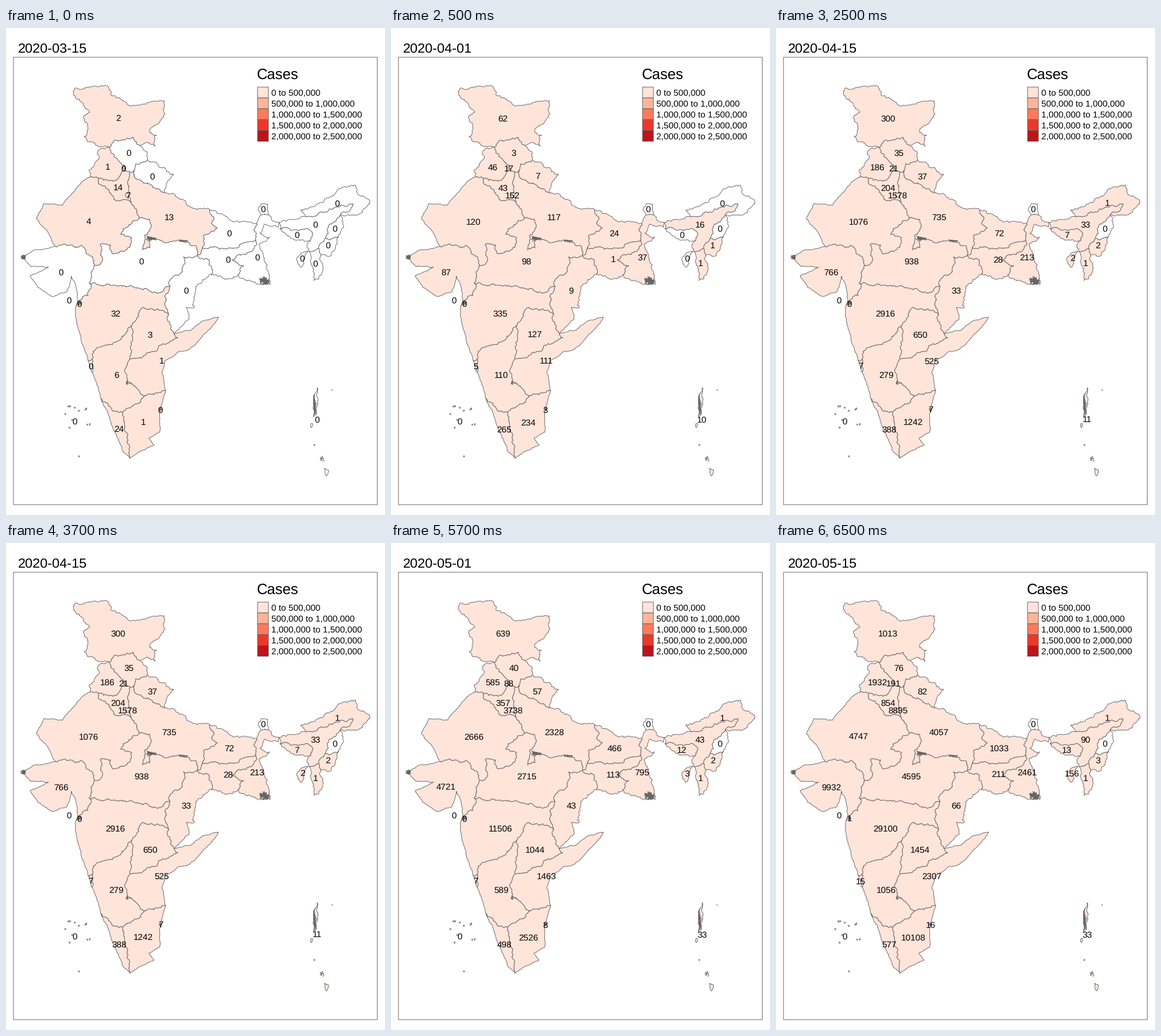
A matplotlib script that plays this animation: 660x849 px, repeating every 8 s.

```python
import math
import random

import matplotlib.pyplot as plt
from matplotlib.animation import FuncAnimation
from matplotlib.patches import Polygon, Rectangle

W, H, DPI = 660, 849, 100
PX = 72 / DPI
STEP = 500
REDS = ["#FEE4D9", "#FDB499", "#FC7A5B", "#EE372A", "#BC141A"]
INK = "#666666"
DATES = ["2020-03-15", "2020-04-01", "2020-04-15", "2020-05-01", "2020-05-15"]

plt.rcParams.update({"font.family": "Liberation Sans", "text.hinting": "none"})
fig = plt.figure(figsize=(W / DPI, H / DPI), dpi=DPI, facecolor="white")
ax = fig.add_axes([0, 0, 1, 1])
ax.set(xlim=(0, W), ylim=(H, 0))
ax.axis("off")

# Points where borders meet; borders and states are spelled with these letters
NODES = {
    "A": (180, 208), "B": (234, 205), "C": (207, 248), "D": (216, 251), "E": (223, 248),
    "F": (246, 230), "G": (277, 287), "H": (146, 260), "I": (161, 262), "J": (218, 305),
    "K": (232, 332), "L": (355, 317), "M": (342, 383), "N": (333, 397), "O": (86, 381),
    "P": (154, 414), "Q": (145, 445), "R": (122, 484), "S": (285, 449), "T": (283, 500),
    "U": (293, 533), "V": (218, 519), "W": (216, 577), "X": (143, 580), "Y": (150, 577),
    "Z": (150, 600), "a": (242, 641), "b": (278, 632), "c": (203, 670), "d": (165, 646),
    "e": (216, 750), "f": (437, 341), "g": (435, 369), "h": (358, 430), "i": (404, 430),
    "j": (117, 110), "k": (582, 326), "l": (556, 367), "m": (545, 385), "n": (528, 390),
    "o": (530, 371), "p": (477, 350), "q": (523, 329), "r": (579, 363), "s": (548, 396),
    "t": (500, 367), "u": (609, 274),
}
borders = {}
states = []


def roughen(points, amount, seed):
    """Jagged line through the points by midpoint displacement."""
    rng = random.Random(seed)
    for _ in range(4):
        out = points[:1]
        for (x0, y0), (x1, y1) in zip(points, points[1:]):
            length = math.hypot(x1 - x0, y1 - y0)
            if length > 3.5:
                d = amount * min(0.28, 2.6 / length) * rng.uniform(-1, 1)
                out.append(((x0 + x1) / 2 + (y0 - y1) * d,
                            (y0 + y1) / 2 + (x1 - x0) * d))
            out.append((x1, y1))
        points = out
    return points


def border(ends, *xy, rough=1.0):
    inner = list(zip(xy[::2], xy[1::2]))
    borders[ends] = roughen([NODES[ends[0]], *inner, NODES[ends[1]]], rough, ends)


def coast(ends, *xy):
    border(ends, *xy, rough=0.4)


def ring(nodes):
    """Closed outline along the borders between successive nodes."""
    path = []
    for a, b in zip(nodes, nodes[1:] + nodes[0]):
        if b + a in borders:
            path += borders[b + a][::-1]
        else:
            if a + b not in borders:
                border(a + b)
            path += borders[a + b]
    return path


def shape(points, z=2):
    return ax.add_patch(Polygon(points, closed=True, fc="white", ec=INK, lw=0.95 * PX,
                                joinstyle="round", zorder=z))


def loop(*xy):
    points = list(zip(xy[::2], xy[1::2]))
    return shape(roughen(points + points[:1], 0.8, xy[0]), 3)


def islet(x, y, rx=1.2, ry=1.4):
    rng = random.Random(f"{x},{y}")
    corners = [(k * math.pi / 4, rng.uniform(0.6, 1.2)) for k in range(8)]
    return shape([(x + rx * r * math.cos(t), y + ry * r * math.sin(t))
                  for t, r in corners], 3)


def scribble(x, y, rx, ry, n):
    """Tangle of lines that is densest in the middle."""
    rng = random.Random(f"{x}/{y}")
    ax.plot([x + rng.triangular(-rx, rx) for _ in range(n)],
            [y + rng.triangular(-ry, ry) for _ in range(n)],
            color=INK, lw=0.8 * PX, zorder=4)


def text(x, y, s, size, **kw):
    return ax.text(x, y, s, fontsize=size * PX, color="black", zorder=9, **kw)


def state(area, x, y, *counts):
    """Area is a node string or ready patches; missing early counts are zero."""
    patches = [shape(ring(area))] if isinstance(area, str) else area
    label = text(x, y + 5.4, "", 15.4, ha="center")
    states.append((patches, label, (0,) * (len(DATES) - len(counts)) + counts))


# North
border("Aj", 160, 206, 136, 189, 143, 176, 135, 157, 146, 147, 137, 138)
border("jB", 150, 102, 176, 101, 183, 117, 218, 136, 276, 127, 277, 150, 262, 168,
       250, 182, 262, 187, 260, 206, 246, 199)
border("AB", 189, 196, 211, 192, 222, 191)
border("AC", 188, 224, 202, 238)
border("AH", 160, 214, 161, 229, 145, 247)
border("IC", 170, 266, 192, 266)
border("EF", 226, 237, 238, 234)
border("FB", 246, 216)
border("FG", 278, 246, 292, 256, 279, 275)
border("EG", 225, 262, 250, 272)
border("IJ", 163, 273, 178, 281, 188, 299, 206, 299)
border("DJ", 212, 272)
border("KP", 204, 350, 200, 360, 219, 366, 211, 386, 186, 394, 182, 378, 164, 378,
       168, 401, 165, 410)
border("OP", 105, 379, 130, 379, 144, 395)
coast("HO", 134, 267, 113, 291, 98, 309, 66, 306, 53, 333, 73, 356)
border("GL", 293, 290, 320, 311)
border("LM", 362, 330, 358, 340, 368, 348, 344, 362)
border("NK", 331, 380, 310, 373, 262, 369, 248, 364, 251, 383, 238, 387, 241, 362,
       253, 345, 249, 333)

# West and centre
border("QR", 148, 453, 143, 466, 131, 473)
border("PQ", 149, 430)
coast("OR", 50, 387, 29, 400, 44, 416, 74, 417, 42, 432, 55, 452, 80, 468, 106, 460,
      114, 433, 120, 444, 125, 475)
border("QS", 165, 449, 192, 449, 220, 450, 246, 455, 270, 461)
border("NS", 309, 399, 312, 410, 300, 431, 287, 437)
border("Nh", 354, 404)
border("hU", 330, 451, 328, 487, 314, 487, 319, 505)
border("ST", 279, 463, 281, 491)
border("TU", 281, 508)
border("TV", 265, 490, 236, 489, 231, 503)
border("VY", 201, 541, 156, 561)
coast("RX", 121, 497, 128, 530)

# South
border("UW", 299, 540, 270, 553, 240, 571)
coast("Ub", 322, 527, 340, 512, 370, 504, 350, 530, 320, 560, 298, 566, 276, 582, 272, 603)
border("ab", 262, 636)
border("Wa", 207, 600, 212, 620, 228, 628)
border("ac", 231, 655, 217, 662)
border("cd", 190, 668)
coast("Zd", 158, 622)
coast("de", 180, 678, 192, 710, 205, 740)
border("ce", 206, 700)
coast("be", 269, 665, 268, 704, 249, 715, 258, 727, 234, 738)

# East and north-east
border("Lf", 388, 333)
border("Mg", 372, 386, 398, 384, 415, 374)
border("gi", 437, 377, 424, 390, 394, 404, 414, 415)
border("hi", 388, 437)
border("fi", 443, 327, 458, 326, 463, 335, 476, 339, 475, 347, 450, 342, 442, 358,
       459, 364, 441, 376, 448, 397, 459, 431, 460, 447, 441, 447, 420, 441)
border("qk", 543, 324, 570, 314, 604, 306, 600, 317)
border("kl", 566, 342)
border("no", 524, 383)
border("op", 533, 362, 528, 352)
border("pq", 476, 339)
border("qu", 513, 318, 545, 306, 577, 283)
border("uk", 612, 289, 634, 303, 618, 323)
border("kr", 588, 345)
border("rs", 566, 397)
border("ns", 531, 410, 536, 440, 545, 437, 551, 415)

# Outline, label centre, one count per date
state("AjB", 195, 157, 2, 62, 300, 639, 1013)
state("ACIH", 177, 242, 1, 46, 186, 585, 1932)
state("BFEDCA", 214, 217, 3, 35, 40, 76)
state("FGE", 255, 258, 7, 37, 57, 82)
state("CDJI", 195, 278, 14, 43, 204, 357, 854)
state("GLMNKJDE", 284, 329.5, 13, 117, 735, 2328, 4057)
state("HIJKPO", 144, 337, 4, 120, 1076, 2666, 4747)
state("OPQR", 96, 425, 87, 766, 4721, 9932)
state("KNSQP", 236, 406, 98, 938, 2715, 4595)
state("NhUTS", 314, 457, 9, 33, 43, 66)
state("RQSTVYX", 190.5, 497, 32, 335, 2916, 11506, 29100)
state("TUWV", 251, 534, 3, 127, 650, 1044, 1454)
state("UbaW", 271, 580, 1, 111, 525, 1463, 2307)
state("YVWacdZ", 192, 604, 6, 110, 279, 589, 1056)
state("XYZ", 147.5, 589, 5, 7, 7, 15)
state("dce", 197, 699, 24, 265, 388, 498, 577)
state("cabe", 239, 687, 1, 234, 1242, 2526, 10108)
state("LfgM", 389, 357.5, 24, 72, 466, 1033)
state("MgihN", 387, 403, 1, 28, 113, 211)
state("fig", 437.5, 399, 37, 213, 795, 2461)
state("qklmnop", 538.5, 342.5, 16, 33, 43, 90)
state("pto", 506.5, 360.5, 7, 12, 13)
state("quk", 577, 305, 1, 1, 1)
state("krl", 572.5, 349)
state("lrsm", 560.5, 378.5, 1, 2, 2, 3)
state("nms", 539, 410, 1, 1, 1, 1)
state([loop(445, 326, 439, 318, 445, 306, 456, 307, 457, 326)], 448, 315)
state([loop(526, 389, 519, 410, 513, 417, 506, 403, 517, 391)], 516, 401, 2, 3, 156)

# Small territories and islands
rng = random.Random(4)
near_isles = [islet(rng.uniform(100, 150), rng.uniform(655, 700)) for _ in range(11)]
far_isles = [loop(542, 627, 543, 645, 535, 678, 537, 645),
             loop(554, 768, 561, 770, 558, 781), islet(532, 692, 2.2, 4)]
state([islet(212, 291, 4, 5)], 212, 291.5, 7, 152, 1578, 3738, 8895)
state([islet(205, 244, 2, 2)], 205, 244.5, 17, 21, 88, 191)
state([islet(128, 480, 3, 3)], 128, 480, 1)
state([], 110, 474)
state([islet(268, 665, 2, 2)], 269, 665, 3, 7, 8, 16)
state(far_isles, 541.5, 682, 10, 11, 33, 33)
state(near_isles + [islet(127, 747)], 120, 685)
islet(568, 631, 0.5, 0.5)
islet(537, 727)

# Creeks, ravines and scattered exclaves
scribble(31, 400, 6, 5, 40)
scribble(450, 441, 11, 9, 90)
scribble(128, 480, 4, 4, 16)
scribble(268, 665, 3, 4, 10)
scribble(253, 367, 12, 5, 30)
scribble(309, 371, 11, 3, 14)
scribble(213, 617, 7, 6, 12)
scribble(538, 655, 4, 25, 24)
scribble(550, 750, 5, 7, 10)

# Frame and legend
ax.add_patch(Rectangle((13, 51), 633.5, 780, fill=False, ec=INK, lw=PX, snap=False))
title = text(21, 42.4, "", 23.5)
text(437, 89, "Cases", 25.6)
for row, color in enumerate(REDS):
    y = 103 + 18.9 * row
    low = 500000 * row
    ax.add_patch(Rectangle((438, y), 19, 18.9, fc=color, ec=INK, lw=PX, snap=False))
    text(462, y + 15.2, f"{low:,} to {low + 500000:,}", 15.4)


def update(step):
    index = (step + 3) // 4  # the first date shows for one step, later ones for four
    title.set_text(DATES[index])
    for patches, label, counts in states:
        count = counts[index]
        label.set_text(str(count))
        for patch in patches:
            patch.set_facecolor(REDS[count // 500000] if count else "white")
    return []


animation = FuncAnimation(fig, update, frames=8000 // STEP, interval=STEP,
                          repeat=True, repeat_delay=0)
plt.show()
```
